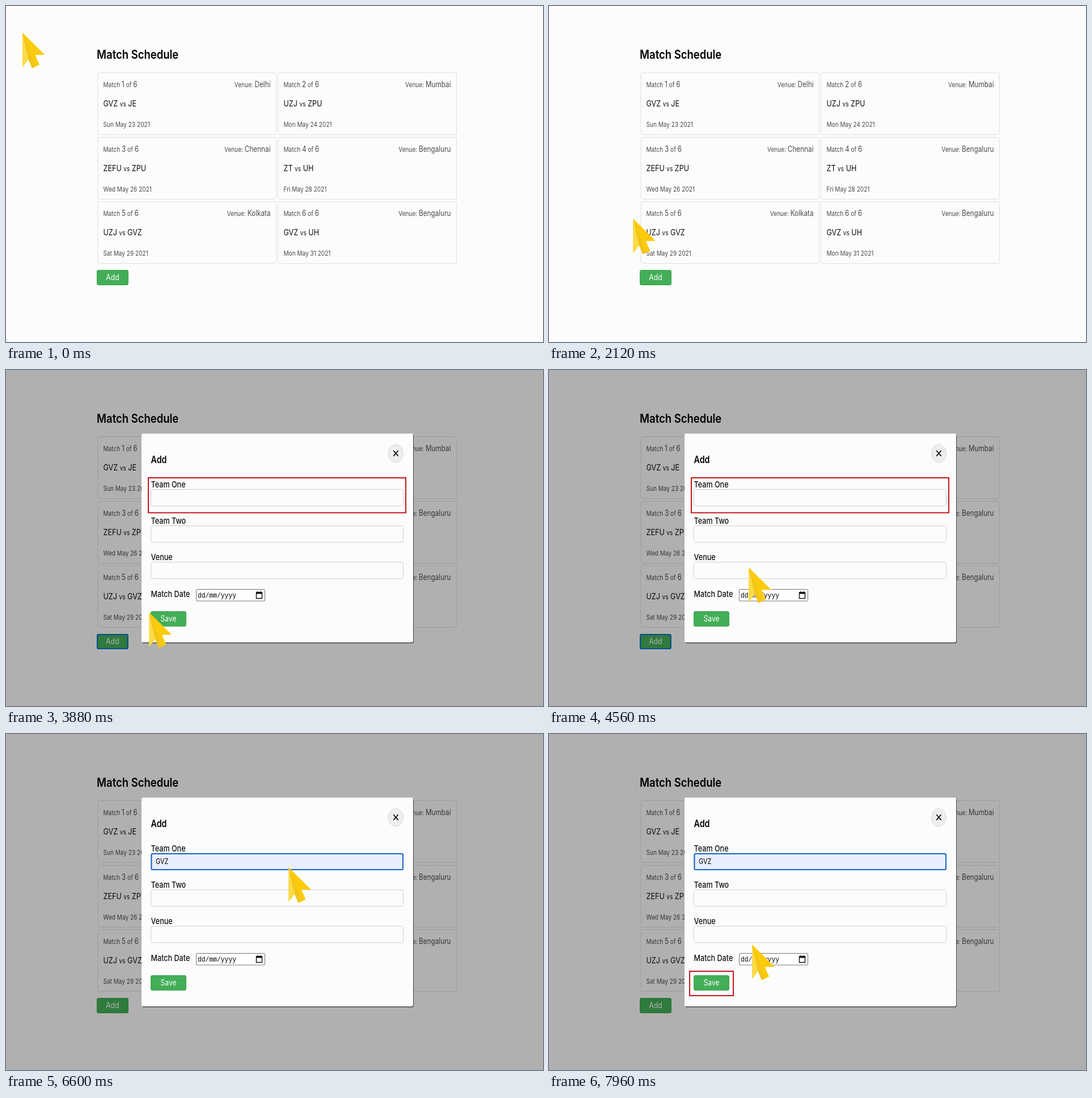
An HTML page that plays this animation: 947x592 px, repeating every 8 s.

```html
<!DOCTYPE html>
<html lang="en">
<head>
<meta charset="utf-8">
<title>Match Schedule</title>
<style>
  html, body { margin: 0; width: 100%; height: 100%; overflow: hidden; background: #fcfcfc; }
  svg { display: block; font-family: Inter, "Open Sans", sans-serif; }
  .small { font-size: 12px; fill: #4c4c4c; }
  .big { font-size: 14px; }
  .teams { font-size: 15px; fill: #111; }
  .vs { font-size: 12px; }
  .title { font-size: 22px; font-weight: 600; }
  .heading { font-size: 17px; font-weight: 600; }
  .label { font-size: 15px; font-weight: 500; fill: #111; }
  .button { font-size: 14.5px; fill: #fcfcfc; text-anchor: middle; }
  .typed { font-size: 13px; }
  .date { font: 13.5px "Liberation Mono", monospace; }
  .end { text-anchor: end; }
  .highlight { fill: none; stroke: #c4161c; stroke-width: 2; }
</style>
</head>
<body>
<svg id="stage" width="947" height="592" viewBox="0 0 947 592"></svg>
<script>
const LOOP = 8000, STEP = 40;
const SQUASH = 0.84; // the whole interface is shown narrower than its natural aspect

const text = (x, y, cls, content) =>
  `<text class="${cls}" transform="translate(${x} ${y}) scale(${SQUASH} 1)">${content}</text>`;
const rect = (x, y, w, h, attrs) =>
  `<rect x="${x}" y="${y}" width="${w}" height="${h}" ${attrs}/>`;
const big = s => `<tspan class="big">${s}</tspan>`;

const matches = [
  ["GVZ", "JE", "Delhi", "Sun May 23 2021"],
  ["UZJ", "ZPU", "Mumbai", "Mon May 24 2021"],
  ["ZEFU", "ZPU", "Chennai", "Wed May 26 2021"],
  ["ZT", "UH", "Bengaluru", "Fri May 28 2021"],
  ["UZJ", "GVZ", "Kolkata", "Sat May 29 2021"],
  ["GVZ", "UH", "Bengaluru", "Mon May 31 2021"],
];

function card([one, two, venue, date], i) {
  const x = 162 + (i % 2) * 318;
  const y = Math.floor(117.5 + (i >> 1) * 113.5) + 0.5;
  return rect(x, y, 314.5, 109, 'rx="3" fill="none" stroke="#dfdfdf"') +
    text(x + 9.5, y + 25.5, "small", `Match ${big(i + 1)} of ${big(6)}`) +
    text(x + 304.5, y + 25.5, "small end", `Venue: ${big(venue)}`) +
    text(x + 9.5, y + 59.5, "teams", `${one} <tspan class="vs">vs</tspan> ${two}`) +
    text(x + 9.5, y + 95.5, "small", date);
}

const button = (x, y, w, label) =>
  rect(x + 0.5, y + 0.5, w - 1, 26, 'rx="2.5" fill="#43ae57" stroke="#3ca450"') +
  text(x + w / 2, y + 18, "button", label);

const field = (y, label) =>
  text(255.5, y - 3, "label", label) +
  rect(255.5, y + 0.5, 445, 29, 'rx="3" fill="#fcfcfc" stroke="#cfcfcf"');

const calendar = `<path d="M441.5 392.5h10v10h-10z" fill="none" stroke="#111" stroke-width="1.4"/>
  <path d="M441 391h11v3.5h-11zM443 390h1.5v2H443zM448.5 390h1.5v2h-1.5z" fill="#111"/>`;

const modal =
  rect(240, 113.5, 479, 368, 'rx="3" fill="#000" opacity=".6"') +
  rect(239, 112, 479, 368, 'rx="3" fill="#fcfcfc"') +
  text(255.5, 164, "heading", "Add") +
  `<ellipse cx="687.3" cy="147" rx="13.2" ry="15.7" fill="#eee" stroke="#d8d8d8"/>
   <path d="M683.2 142l8.4 9.6m0-9.6l-8.4 9.6" stroke="#111" stroke-width="1.8"/>` +
  field(210, "Team One") + field(274, "Team Two") + field(338, "Venue") +
  text(255.5, 400, "label", "Match Date") +
  rect(335.5, 386.5, 121, 20.5, 'rx="1" fill="#fff" stroke="#767676"') +
  text(338, 400.7, "date", "dd/mm/yyyy") + calendar +
  button(255, 425, 63, "Save");

const pointer = `<path d="M0 0L39.5 39 22.5 39.5 30 56.5 17 62.5 10.5 47 0 60.5z" fill="#fccb0a"/>
  <path d="M0 0L10.5 47 0 60.5z" fill="#fbdb48"/>
  <path d="M0 0L23.5 59.5 17 62.5 10.5 47z" fill="#f2c51c"/>`;

const stage = document.getElementById("stage");
stage.innerHTML =
  rect(0, 0, 947, 592, 'fill="#fcfcfc"') +
  text(160, 93, "title", "Match Schedule") +
  matches.map(card).join("") +
  button(160, 465, 56, "Add") +
  `<g id="dialog">
     ${rect(0, 0, 947, 592, 'opacity=".3"')}
     <g id="addFocus">${rect(161, 466, 53.5, 25, 'rx="2" fill="none" stroke="#0b4d94" stroke-width="2"')}</g>
     ${modal}
     <g id="filled">
       ${rect(256.5, 211, 443.5, 28, 'rx="2" fill="#e8eefb" stroke="#1467c8" stroke-width="2"')}
       ${text(264, 229, "typed", "GVZ")}
     </g>
   </g>` +
  rect(147, 458, 82.5, 44, 'class="highlight"') +
  rect(251, 190, 454, 61.5, 'class="highlight"') +
  rect(248, 418, 77, 43, 'class="highlight"') +
  `<g id="cursor">${pointer}</g>`;

const [dialog, addFocus, filled, cursor] =
  ["dialog", "addFocus", "filled", "cursor"].map(id => document.getElementById(id));
const highlights = stage.querySelectorAll(".highlight");

// Cursor moves: first time it may appear, start, end, start point, end point.
const moves = [
  { from: 0, start: 320, end: 2695, a: [29, 47], b: [186.5, 479.5] },
  { from: 3000, start: 3430, end: 5600, a: [186.5, 479.5], b: [505, 227] },
  { from: 6000, start: 6600, end: 8000, a: [498.5, 235], b: [354, 375] },
];
const HIGHLIGHT_ON = 420, HIGHLIGHT_OFF = 1540;

const show = (el, on) => el.setAttribute("visibility", on ? "visible" : "hidden");

function render(t) {
  const modalOpen = t >= 3000, typed = t >= 6000;
  show(dialog, modalOpen);
  show(addFocus, modalOpen && !typed);
  show(filled, typed);

  const move = moves.filter(m => t >= m.from).pop();
  const k = Math.min(1, Math.max(0, (t - move.start) / (move.end - move.start)));
  const [x, y] = move.a.map((v, i) => v + (move.b[i] - v) * k);
  cursor.setAttribute("transform", `translate(${x} ${y})`);

  highlights.forEach((el, i) => {
    const age = t - moves[i].start;
    show(el, age >= HIGHLIGHT_ON && age < HIGHLIGHT_OFF);
  });
}

const origin = performance.now();
function tick() {
  const t = (performance.now() - origin) % LOOP;
  render(Math.floor(t / STEP) * STEP);
  requestAnimationFrame(tick);
}
tick();
</script>
</body>
</html>
```
